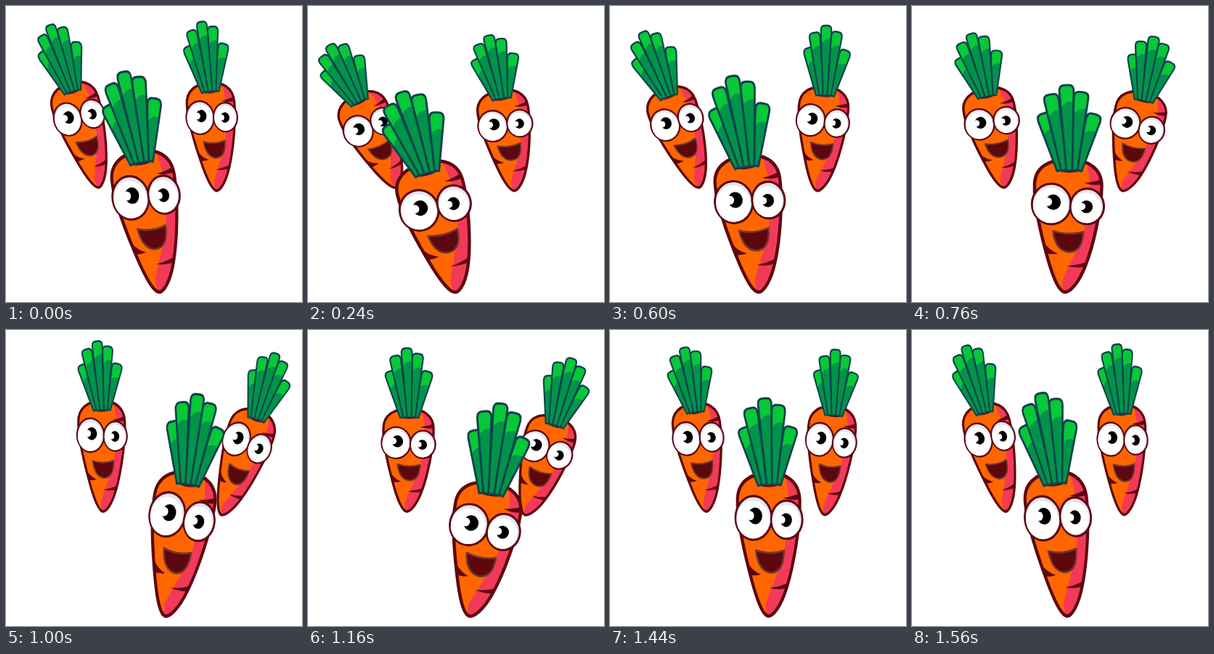
Write an HTML page that moves like this. It is 408 px wide and 408 px high and loops after 1600 ms.

```html
<!DOCTYPE html>
<html lang="en">
<head>
<meta charset="utf-8">
<title>Dancing carrots</title>
<style>
  html, body { margin: 0; width: 100%; height: 100%; overflow: hidden; background: #fff; }
  svg { display: block; width: 100vw; height: 100vh; }
</style>
</head>
<body>
<svg viewBox="0 0 408 408">
  <defs>
    <path id="shape" d="M208 394C200 393 193 377 186 355C177 325 164 275 165 247C165 222 186 212 212 212C239 212 258 224 258 248C258 280 247 330 236 358C226 384 214 394 208 394Z"/>
    <clipPath id="inside"><use href="#shape"/></clipPath>
    <g id="carrot" stroke-linejoin="round">
      <use href="#shape" fill="#ff6600"/>
      <g clip-path="url(#inside)">
        <path fill="#f23a58" d="M233 205C245 235 243 270 236 300C230 330 214 354 204 379L206 400L275 385L270 205Z"/>
        <path fill="#5f0710" d="M262 237Q248 243 233 244Q247 249 262 245ZM180 328Q187 337 198 341Q188 343 181 341ZM242 351Q226 357 210 358Q226 362 242 358Z"/>
      </g>
      <use href="#shape" fill="none" stroke="#5f0710" stroke-width="4.5"/>
      <ellipse cx="213" cy="224" rx="19" ry="6" fill="#5f0710"/>
      <g id="leaves" stroke-width="2.9"></g>
      <g id="eyes"></g>
      <path fill="#5c080e" stroke="#71362f" stroke-width="2.5" d="M191 310Q212 317 233 311Q232 339 213 339Q194 337 191 310Z"/>
    </g>
  </defs>
  <use href="#carrot" class="dancer"/>
  <use href="#carrot" class="dancer"/>
  <use href="#carrot" class="dancer"/>
</svg>
<script>
const LOOP = 1600, STEP = 40;
const leaves = document.getElementById('leaves');
const eyes = document.getElementById('eyes');
const dancers = document.querySelectorAll('.dancer');

// Base x, angle and length of each leaf
leaves.innerHTML = [
  [200, -17, 80], [226, 16, 79], [206, -11, 104], [220, 5, 106], [213, -2.5, 115]
].map(([x, angle, len]) => {
  const tip = `L-10 ${8 - len}Q-10 ${-len} -3 ${-len}H3Q10 ${-len} 10 ${8 - len}`;
  const blade = `M-4 0${tip}L4 0Z`;
  return `<g transform="translate(${x} 227) rotate(${angle})">
    <path fill="#00934a" d="${blade}"/>
    <path fill="#06c838" d="M-8.6 ${31 - len}${tip}L9 ${23 - len}Q-2 ${20 - len} -8.6 ${31 - len}Z"/>
    <path fill="none" stroke="#12424e" d="${blade}"/></g>`;
}).join('');

// Centre, radii, then pupil centre and radius
eyes.innerHTML = [
  [188.5, 273.5, 27, 27.7, 191, 271, 10.5], [238, 276.5, 23.3, 24.3, 237, 277, 8.8]
].map(([x, y, rx, ry, px, py, r]) => `
  <ellipse cx="${x}" cy="${y}" rx="${rx}" ry="${ry}" fill="#e1e4f1" stroke="#5f0710" stroke-width="3"/>
  <ellipse cx="${x - 1}" cy="${y + 2}" rx="${rx - 2.5}" ry="${ry - 3.5}" fill="#fff"/>
  <circle cx="${px}" cy="${py}" r="${r}"/>
  <circle cx="${px - r * .7}" cy="${py - r * .05}" r="${r * .55}" fill="#fff"/>`).join('');

// Tip position, size, mean tilt, swing and time of the leftmost lean
const poses = [
  { x: 128.5, y: 251, size: .76, tilt: -13, swing: 13, peak: 345 },
  { x: 291, y: 255.5, size: .76, tilt: 4.6, swing: 14.2, peak: 226 },
  { x: 212.5, y: 395.5, size: 1, tilt: -3.2, swing: 12.2, peak: 284 }
];

const wave = (t, peak, period = LOOP) => Math.cos(2 * Math.PI * (t - peak) / period);

function draw(now) {
  const t = Math.floor(now % LOOP / STEP) * STEP;
  const bounce = LOOP / 3;
  const tall = 1.051 + .053 * wave(t, 448, bounce);
  const wide = 1 - .9 * (tall - 1);
  const leafTall = 1.01 + .055 * wave(t, 105, bounce);
  leaves.setAttribute('transform', `translate(0 227) scale(1 ${leafTall}) translate(0 -227)`);
  eyes.setAttribute('transform', `translate(0 ${-55 * (tall - 1)})`);

  const swayTime = t + 20 * Math.max(0, 1 - t / 500); // the loop restarts slightly ahead
  poses.forEach(({ x, y, size, tilt, swing, peak }, i) => {
    const tipX = x - 10 * size * wave(swayTime, 405);
    const angle = tilt - swing * wave(swayTime, peak);
    dancers[i].setAttribute('transform',
      `translate(${tipX} ${y}) rotate(${angle}) scale(${size * wide} ${size * tall}) translate(-208 -395)`);
  });
}

const start = performance.now();
function tick() {
  draw(performance.now() - start);
  requestAnimationFrame(tick);
}
tick();
</script>
</body>
</html>
```
